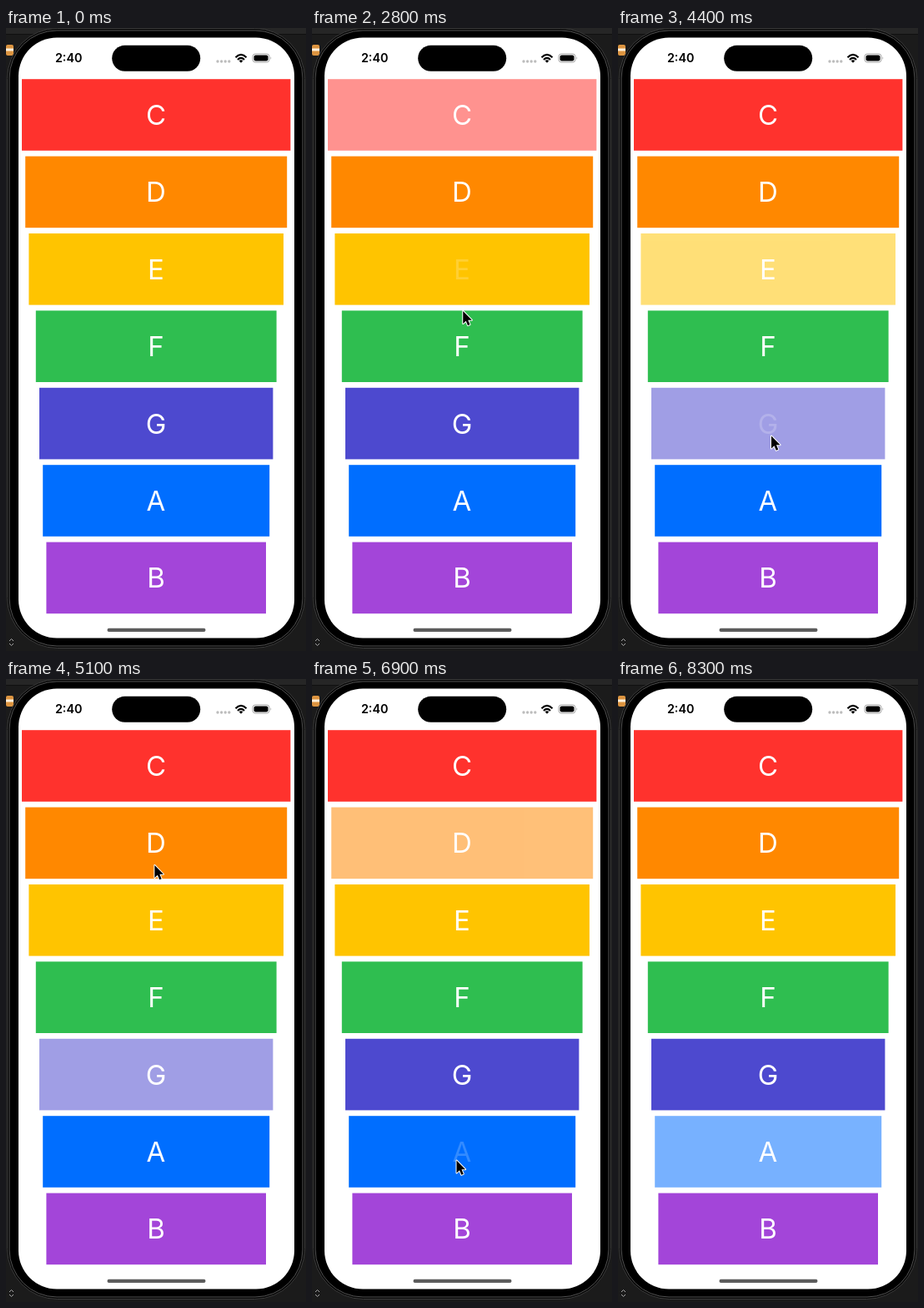
These frames come from a looping animation (360 px wide and 746 px high, 8.9 s). An HTML page:

```html
<!DOCTYPE html>
<html lang="en">
<head>
<meta charset="utf-8">
<title>Xylophone</title>
<style>
  html, body { margin: 0; width: 100%; height: 100%; overflow: hidden; background: #1b1b1b; }
  svg { display: block; width: 360px; height: 746px; }
  text { font-family: Inter, Roboto, "Liberation Sans", sans-serif; text-anchor: middle; }
  .key { font-size: 33px; fill: #fff; }
  .clock { font-size: 14.4px; font-weight: 600; }
</style>
</head>
<body>
<svg viewBox="0 0 360 746" xmlns="http://www.w3.org/2000/svg">
  <!-- desktop behind the phone -->
  <rect width="360" height="746" fill="#1b1b1b"/>
  <rect width="360" height="7" fill="#262626"/>
  <rect y="7" width="360" height="1" fill="#101010"/>
  <rect y="20" width="9" height="13" rx="2" fill="#dc9440"/>
  <path d="M0 26H9" stroke="#fff1dc" stroke-width="3"/>
  <path d="M4 734L6.500 731.500L9 734M4 737L6.500 739.500L9 737" fill="none" stroke="#a8a8a8"/>

  <!-- phone -->
  <rect x="1.500" y="0.500" width="357" height="742" rx="60" fill="#060606" stroke="#3c3c3c"/>
  <rect x="4" y="3" width="352" height="737" rx="57" stroke="#515151"/>
  <rect x="15" y="11.500" width="331" height="719" rx="46" fill="#fff"/>
  <rect x="127.200" y="20.800" width="106" height="31" rx="15.500"/>
  <text class="clock" x="75.200" y="41.400">2:40</text>
  <path d="M254 40H268" stroke="#bdbdbd" stroke-width="3.400" stroke-linecap="round" stroke-dasharray="0 4.600"/>
  <g fill="none" stroke="#000" stroke-width="2.200">
    <path d="M275.500 35.200Q282 28.600 288.500 35.200"/>
    <path d="M278 37.900Q282 33.800 286 37.900"/>
  </g>
  <path d="M279.700 39.300Q282 37.300 284.300 39.300L282 41.700Z"/>
  <rect x="296" y="31" width="20" height="10" rx="3.200" fill="#fff" stroke="#a5a5a5"/>
  <rect x="297.500" y="32.500" width="17" height="7" rx="2"/>
  <path d="M317.500 34.300Q319.300 36 317.500 37.700Z" fill="#a5a5a5"/>
  <g id="keys"></g>
  <rect x="121.500" y="718.800" width="118" height="4.200" rx="2.100" fill="#5c5c5c"/>

  <path id="cursor" d="M0 0V15L3.500 11.800L5.800 17.300L8.300 16.200L6 10.800H10.600Z"
    stroke="#fff" stroke-width="2" stroke-linejoin="round" paint-order="stroke"/>
</svg>
<script>
const LOOP = 8900, TICK = 100;
const HOLD = 500, PALE = 2100, FADE = 400;
const CENTER = 180.2, PITCH = 92.4, HEIGHT = 85.6;

const COLORS = {
  C: "#ff322d", D: "#ff8800", E: "#ffc400", F: "#2fbe50",
  G: "#4d49cf", A: "#006eff", B: "#a345d9"
};

// where the pointer rests, and which key it presses there
const STOPS = [
  { x: 359, y: 22, arrive: 0, leave: 0 },
  { x: 197, y: 118, arrive: 1000, leave: 1200, key: "C", press: 1000 },
  { x: 180, y: 272, arrive: 2100, leave: 2700, key: "E", press: 2400 },
  { x: 184, y: 488.5, arrive: 3200, leave: 4400, key: "G", press: 3900 },
  { x: 178, y: 206, arrive: 5300, leave: 5500, key: "D", press: 5400 },
  { x: 173.5, y: 576.5, arrive: 6700, leave: 7400, key: "A", press: 6900 },
  { x: 359, y: 24, arrive: 8000, leave: 8300 }
];

const clamp = v => Math.min(1, Math.max(0, v));
const easeOut = k => Math.sin(k * Math.PI / 2);

const make = (tag, attrs, parent) => {
  const el = document.createElementNS("http://www.w3.org/2000/svg", tag);
  for (const name in attrs) el.setAttribute(name, attrs[name]);
  return parent.appendChild(el);
};

const keys = {};
Object.entries(COLORS).forEach(([label, fill], i) => {
  const y = 61.2 + i * PITCH;
  const inset = i < 3 ? i : i + 1;
  const half = 161.2 - 4.2 * inset;
  const group = make("g", {}, document.getElementById("keys"));
  make("rect", { x: CENTER - half, y, width: 2 * half, height: HEIGHT, fill }, group);
  const text = make("text", { class: "key", x: 180, y: y + HEIGHT / 2 + 12 }, group);
  text.textContent = label;
  keys[label] = { group, text };
});
const cursor = document.getElementById("cursor");

function drawKey({ key, press }, t) {
  const { group, text } = keys[key];
  const up = press + HOLD;
  const pale = t >= up && t < up + PALE;
  const ink = t < press ? 1 : 0.2 + 0.8 * clamp((t - up) / FADE);
  group.setAttribute("opacity", pale ? 0.53 : 1);
  text.setAttribute("opacity", ink);
}

function drawCursor(t) {
  const shown = t > 0 && t < STOPS.at(-1).leave;
  cursor.style.display = shown ? "" : "none";
  if (!shown) return;
  const i = STOPS.findIndex(s => s.leave > t);
  const from = STOPS[i - 1], to = STOPS[i];
  const k = easeOut(clamp((t - from.leave) / (to.arrive - from.leave)));
  const x = from.x + (to.x - from.x) * k;
  const y = from.y + (to.y - from.y) * k;
  cursor.setAttribute("transform", `translate(${x} ${y})`);
}

const start = performance.now();
function frame() {
  const now = (performance.now() - start) % LOOP;
  const t = Math.floor(now / TICK) * TICK;
  for (const stop of STOPS) if (stop.key) drawKey(stop, t);
  drawCursor(t);
  requestAnimationFrame(frame);
}
frame();
</script>
</body>
</html>
```
